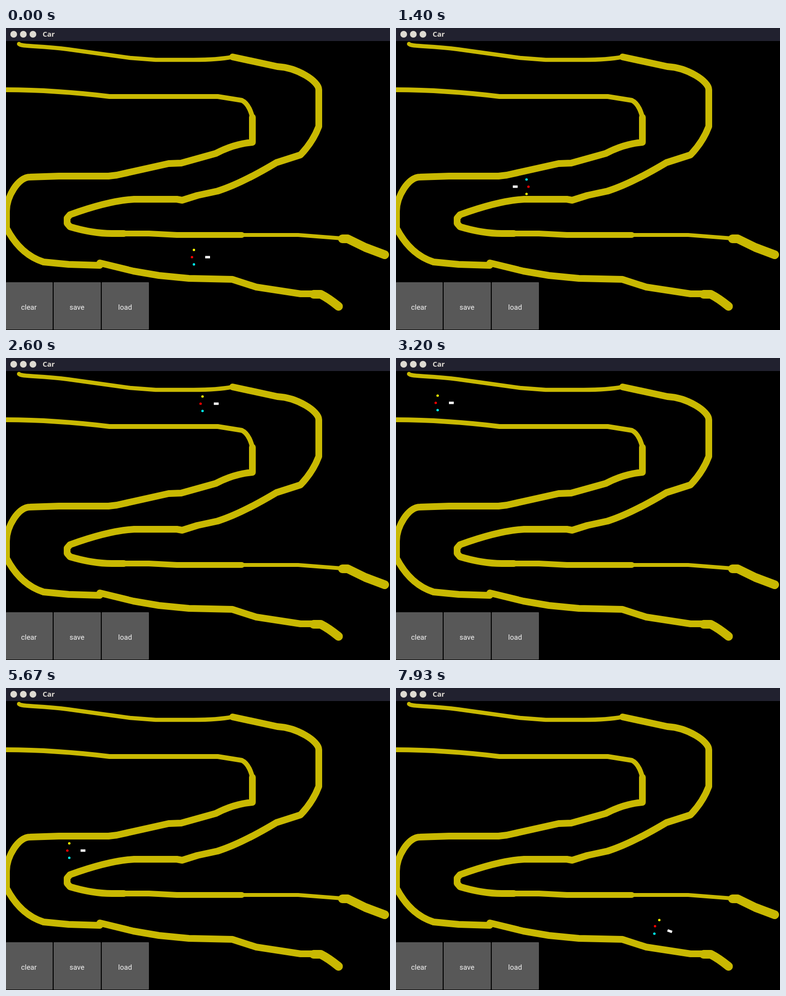
Animation of 798 by 626 pixels, one loop 8000 ms. Source, as an HTML page:

```html
<!DOCTYPE html>
<html lang="en">
<head>
<meta charset="utf-8">
<title>Car</title>
<style>
  html, body { margin: 0; width: 100%; height: 100%; overflow: hidden; background: #000; }
  svg { display: block; width: 798px; height: 626px; }
  .track path { fill: none; stroke: #c9b902; stroke-linecap: round; stroke-linejoin: round; }
  .bar { fill: #21212f; }
  .bar-item { fill: #dfdbd2; }
  .title { font: bold 15px "Open Sans", sans-serif; }
  .button rect { fill: #585858; }
  .button text { font: 15px Roboto, sans-serif; fill: #f4f4f4; text-anchor: middle; }
</style>
</head>
<body>
<svg viewBox="0 0 798 626">
  <rect width="798" height="626"/>
  <rect id="car" x="-5" y="-2.5" width="10" height="5" fill="#fff"/>
  <g id="sensors"></g>

  <g class="track">
    <path stroke-width="8.5" d="M27 33C32 39 70 36 128 44L258 62 311 66H390Q440 66 470 60"/>
    <path stroke-width="14" d="M471 60L564 80C605 82 650 110 650 128V204Q638 236 612 263L562 279Q488 323 440 338L398 347 366 357 355 355H266Q213 358 133 387L127 394V405L133 412Q180 426 220 426H245"/>
    <path stroke-width="12" d="M245 426H297L355 429H490"/>
    <path stroke-width="8" d="M490 429H607L697 436"/>
    <path stroke-width="18" d="M699 437H710L747 455 787 470"/>
    <path stroke-width="10" d="M-5 128Q100 128 215 142H440L490 150Q505 157 512 185"/>
    <path stroke-width="14" d="M512 185V237Q474 240 436 260L364 280 338 281 230 305 213 307H110L50 309C25 309 1 350 1 380V415Q30 470 78 485L130 490 195 492V487L265 504 318 513 380 519 470 521 520 537 612 551H650"/>
    <path stroke-width="18" d="M639 552H654Q670 560 691 577"/>
  </g>

  <rect class="bar" width="798" height="27"/>
  <g class="bar-item">
    <circle cx="16" cy="13" r="7"/>
    <circle cx="36" cy="13" r="7"/>
    <circle cx="56" cy="13" r="7"/>
    <text class="title" x="76" y="18">Car</text>
  </g>

  <g class="button"><rect y="527" width="97" height="98" rx="1"/><text x="47.5" y="584">clear</text></g>
  <g class="button"><rect x="99" y="527" width="98" height="98" rx="1"/><text x="147.5" y="584">save</text></g>
  <g class="button"><rect x="199" y="527" width="98" height="98" rx="1"/><text x="247.5" y="584">load</text></g>
</svg>
<script>
  const LOOP = 8000, STEP = 1000 / 15, TURN = 20, REACH = 30;
  const svgNode = name => document.createElementNS("http://www.w3.org/2000/svg", name);
  const setAll = (node, values) => {
    for (const name in values) node.setAttribute(name, values[name]);
  };

  // The car drives each leg at an even pace until its last step.
  const legs = [
    [14, "M419 475C283 475 165 462 100 432S10 359 31 342"],
    [30, "M31 342C55 322 90 334 150 334C300 334 400 301 520 257"],
    [48, "M520 257C570 239 592 205 592 165C592 110 560 95 490 95L115 93"],
    [60, "M115 93C95 93 95 110 115 110S140 80 120 80S110 95 150 95"],
    [85, "M150 95H480C545 95 570 125 570 165C570 225 545 245 470 272S270 337 160 337"],
    [102, "M160 337C100 337 62 365 62 405C62 455 120 467 200 467C320 467 395 491 475 462"],
    [119, "M475 462C520 446 560 475 620 500S730 560 728 535S640 530 569 504"]
  ].map(([end, d], i, all) => {
    const path = svgNode("path");
    path.setAttribute("d", d);
    return { start: i ? all[i - 1][0] : 0, end, path, length: path.getTotalLength() };
  });

  const car = document.getElementById("car");
  const sensors = [["#f00", 0], ["#ff0", -30], ["#0ff", 30]].map(([fill, offset]) => {
    const dot = svgNode("circle");
    setAll(dot, { r: 2.5, fill });
    document.getElementById("sensors").append(dot);
    return { dot, offset };
  });

  function poseAt(step) {
    const { start, end, path, length } = legs.find(leg => step <= leg.end);
    const distance = length * (step - start) / (end - start);
    const { x, y } = path.getPointAtLength(distance);
    const back = path.getPointAtLength(Math.max(0, distance - 1));
    const ahead = path.getPointAtLength(distance + 1);
    const angle = Math.atan2(back.y - ahead.y, ahead.x - back.x) * 180 / Math.PI;
    return { x, y, heading: Math.round(angle / TURN) * TURN };
  }

  function draw(time) {
    // Steps land on times rounded to 10 ms.
    const step = Math.min(119, Math.floor((time % LOOP + 3.34) / STEP));
    const { x, y, heading } = poseAt(step);
    car.setAttribute("transform", `translate(${x} ${y}) rotate(${-heading})`);
    for (const { dot, offset } of sensors) {
      const angle = (heading + offset) * Math.PI / 180;
      setAll(dot, { cx: x - 2.5 + REACH * Math.cos(angle), cy: y - REACH * Math.sin(angle) });
    }
  }

  const begin = performance.now();
  function tick() {
    draw(performance.now() - begin);
    requestAnimationFrame(tick);
  }
  tick();
</script>
</body>
</html>
```
